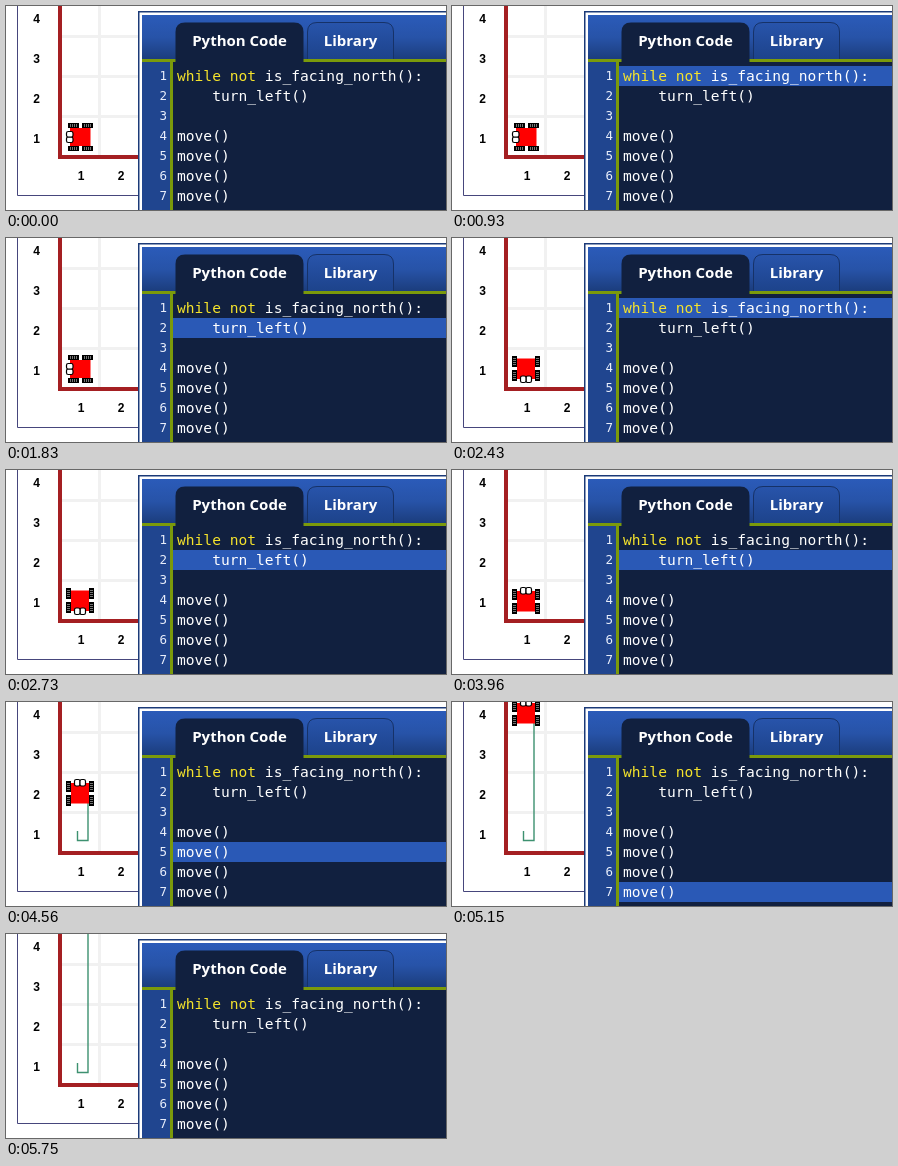
An HTML page for the animation above (7180 ms loop, 440 px wide and 204 px high).

```html
<!DOCTYPE html>
<html lang="en">
<head>
<meta charset="utf-8">
<title>Robot turning north</title>
<style>
html, body { margin: 0; width: 100%; height: 100%; overflow: hidden; background: #fff; }
svg { display: block; }
.label { font: bold 12px "Liberation Sans", Arial, sans-serif; text-anchor: middle; }
.tab { font: bold 15px "Open Sans", "Noto Sans", sans-serif; text-anchor: middle; fill: #fff; }
.code { font: 14.6px "DejaVu Sans Mono", monospace; fill: #fff; white-space: pre; }
.num { font: 12.5px "DejaVu Sans Mono", monospace; fill: #e8eefb; text-anchor: end; }
.key { fill: #f5e32c; }
</style>
</head>
<body>
<svg width="440" height="204" viewBox="0 0 440 204">
  <defs>
    <linearGradient id="bar" x2="0" y2="1">
      <stop stop-color="#2b5bb9"/>
      <stop offset=".5" stop-color="#2753a8"/>
      <stop offset="1" stop-color="#1b3c7b"/>
    </linearGradient>
    <linearGradient id="idle" x2="0" y2="1">
      <stop stop-color="#2854ab"/>
      <stop offset="1" stop-color="#1d438b"/>
    </linearGradient>
    <g id="wheel">
      <rect width="5" height="11"/>
      <path d="M1 2.5h3M1 4.5h3M1 6.5h3M1 8.5h3" stroke="#aaa" stroke-width=".7"/>
    </g>
  </defs>

  <!-- world -->
  <path d="M11.5 0V189.5H134" fill="none" stroke="#46467c"/>
  <path d="M56 30.5H132M56 70.5H132M56 110.5H132M93.5 0V149" stroke="#f1f1f1" stroke-width="3"/>
  <path d="M54 0V151H134" fill="none" stroke="#a41f22" stroke-width="4"/>
  <g id="labels"></g>
  <polyline id="trace" fill="none" stroke="#3d9170" stroke-width="1.4"/>
  <g id="robot">
    <use href="#wheel" x="-14" y="-12"/><use href="#wheel" x="9" y="-12"/>
    <use href="#wheel" x="-14" y="2"/><use href="#wheel" x="9" y="2"/>
    <path d="M-10 -6H10M-10 7H10" stroke="#000"/>
    <rect x="-9" y="-10" width="18" height="20.5" fill="#f00"/>
    <g fill="#fff" stroke="#000" stroke-width="1.2">
      <rect x="-5.5" y="-13.5" width="5.5" height="6.5" rx="1.8"/>
      <rect x="0" y="-13.5" width="5.5" height="6.5" rx="1.8"/>
    </g>
  </g>

  <!-- editor -->
  <rect x="132" y="5" width="308" height="199" fill="#1b3a78"/>
  <rect x="133.5" y="6.5" width="307" height="198" fill="#fff"/>
  <rect x="136" y="9" width="304" height="45" fill="url(#bar)"/>
  <rect x="136" y="55" width="28" height="149" fill="#20458f"/>
  <rect x="167" y="55" width="273" height="149" fill="#11203f"/>
  <path d="M301.5 53V26q0-9.500 9.500-9.500H378q9.500 0 9.500 9.500V53" fill="url(#idle)" stroke="#163268"/>
  <path d="M136 54.500H440M165.500 54V204" stroke="#7b9a0b" stroke-width="3"/>
  <path d="M169.500 57V26q0-9.500 9.500-9.500H288q9.500 0 9.500 9.500V57" fill="#11203f"/>
  <text class="tab" x="233.500" y="40">Python Code</text>
  <text class="tab" x="344.500" y="40">Library</text>
  <rect id="mark" x="167" width="273" height="20" fill="#2a59b6"/>
  <g id="code"></g>
</svg>
<script>
const $ = id => document.getElementById(id);
const LOOP = 7180;
const WEST = -90, SOUTH = 180, EAST = 90, NORTH = 0;

// start time, marked line (0 = none), heading, robot y, trace corners reached
const steps = [
  [0, 0, WEST, 131, 0],
  [930, 1, WEST, 131, 0],
  [1830, 2, WEST, 131, 0],
  [2130, 2, SOUTH, 131, 0],
  [2430, 1, SOUTH, 131, 2],
  [2730, 2, SOUTH, 131, 2],
  [3060, 2, EAST, 131, 2],
  [3360, 1, EAST, 131, 3],
  [3660, 2, EAST, 131, 3],
  [3960, 2, NORTH, 131, 3],
  [4260, 4, NORTH, 131, 4],
  [4560, 5, NORTH, 91, 4],
  [4890, 6, NORTH, 51, 4],
  [5150, 7, NORTH, 11, 4],
  [5450, 0, NORTH, -29, 4]
];

const code = ['<tspan class="key">while not</tspan> is_facing_north():',
  '    turn_left()', '', 'move()', 'move()', 'move()', 'move()'];
$('code').innerHTML = code.map((line, i) => {
  const y = 75 + i * 20;
  return `<text class="num" x="161" y="${y - 1}">${i + 1}</text>` +
    `<text class="code" x="171" y="${y}">${line}</text>`;
}).join('');

const label = (x, y, n) => `<text class="label" x="${x}" y="${y}">${n}</text>`;
$('labels').innerHTML = [1, 2, 3, 4].map(n => label(30.5, 177 - n * 40, n)).join('') +
  label(75, 174, 1) + label(115, 174, 2);

function draw(now) {
  const t = now % LOOP;
  const [, line, heading, y, corners] = steps.findLast(s => s[0] <= t);
  $('mark').setAttribute('y', line ? 40 + line * 20 : 300);
  $('robot').setAttribute('transform', `translate(74 ${y}) rotate(${heading})`);
  const path = [[71.5, 129], [71.5, 138.5], [82, 138.5], [82, y]];
  $('trace').setAttribute('points', path.slice(0, corners).join(' '));
}

const start = performance.now();
function frame() {
  draw(performance.now() - start);
  requestAnimationFrame(frame);
}
frame();
</script>
</body>
</html>
```
